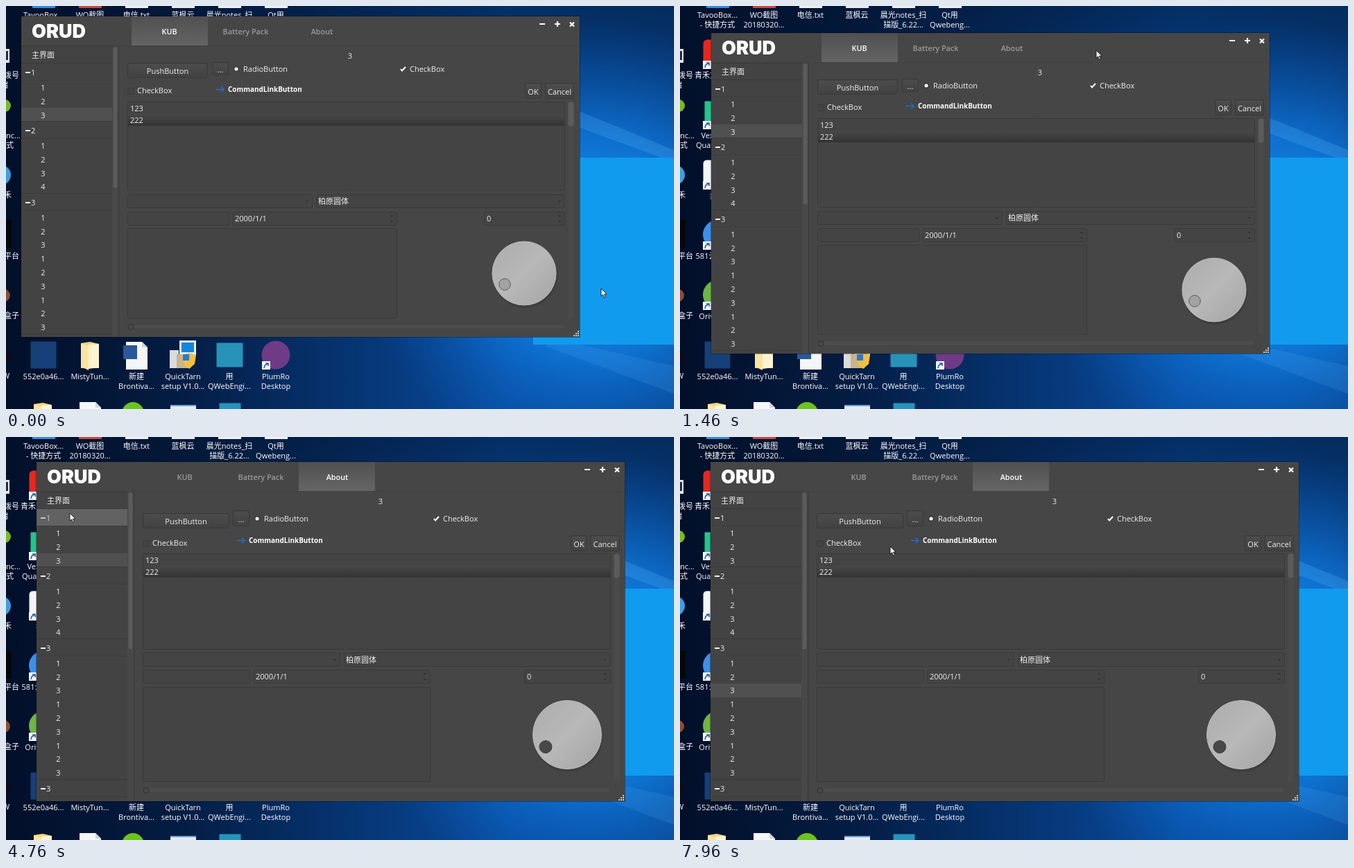
An HTML page with a canvas for the animation above (8000 ms loop, 963 by 582 pixels).

```html
<!DOCTYPE html>
<html lang="zh">
<head>
<meta charset="utf-8">
<title>Desktop window demo</title>
<style>
html, body { margin: 0; width: 100%; height: 100%; overflow: hidden; background: #041a3d; }
canvas { display: block; }
</style>
</head>
<body>
<canvas id="stage" width="963" height="582"></canvas>
<script>
const W = 963, H = 582, LOOP = 8000;
const FACE = '"Open Sans", "Noto Sans CJK SC", "Noto Sans CJK", sans-serif';
const screen2d = document.getElementById('stage').getContext('2d');
let c = screen2d;

// ---------- drawing helpers ----------
function rect(x, y, w, h, fill) {
  c.fillStyle = fill;
  c.fillRect(x, y, w, h);
}
function disc(x, y, r, fill, line) {
  c.beginPath();
  c.arc(x, y, r, 0, Math.PI * 2);
  if (fill) { c.fillStyle = fill; c.fill(); }
  if (line) { c.strokeStyle = line; c.lineWidth = 1; c.stroke(); }
}
function round(x, y, w, h, r, fill, line) {
  c.beginPath();
  c.roundRect(x + .5, y + .5, w - 1, h - 1, r);
  if (fill) { c.fillStyle = fill; c.fill(); }
  if (line) { c.strokeStyle = line; c.lineWidth = 1; c.stroke(); }
}
function poly(points, fill) {
  c.beginPath();
  points.forEach(([x, y]) => c.lineTo(x, y));
  c.closePath();
  c.fillStyle = fill;
  c.fill();
}
function strokes(lines, color, width) {
  c.strokeStyle = color;
  c.lineWidth = width;
  c.beginPath();
  for (const [first, ...rest] of lines) {
    c.moveTo(...first);
    rest.forEach(p => c.lineTo(...p));
  }
  c.stroke();
}
// y is the middle of the capitals
function text(s, x, y, { color = '#f0f0f0', align = 'left', font = '11px ' + FACE, drop = 4 } = {}) {
  c.font = font;
  c.textAlign = align;
  c.fillStyle = color;
  c.fillText(s, x, y + drop);
}
function ramp(x0, y0, x1, y1, ...stops) {
  const g = c.createLinearGradient(x0, y0, x1, y1);
  stops.forEach((s, i) => g.addColorStop(i / (stops.length - 1), s));
  return g;
}

// ---------- desktop ----------
function wallpaper() {
  rect(0, 0, W, H, ramp(0, 0, W, 0, '#020f29', '#041c42', '#06336f', '#084b9e', '#08468f'));
  rect(0, 0, W, 220, ramp(0, 0, 0, 220, 'rgba(2,18,44,.5)', 'rgba(2,18,44,0)'));
  const glow = c.createRadialGradient(850, 350, 20, 850, 350, 330);
  glow.addColorStop(0, 'rgba(22,160,255,.9)');
  glow.addColorStop(.45, 'rgba(16,130,232,.7)');
  glow.addColorStop(1, 'rgba(10,90,190,0)');
  c.fillStyle = glow;
  c.fillRect(0, 0, W, H);
  poly([[780, 133], [W, 208], [W, 226], [780, 158]], 'rgba(90,185,255,.22)');
  poly([[780, 478], [W, 520], [W, 560], [780, 492]], 'rgba(90,185,255,.14)');
  rect(760, 219, 272, 270, '#119bee');
}
function shortcut(x, y) {
  rect(x, y, 12, 12, '#f4f6f8');
  strokes([[[x + 3, y + 10], [x + 4, y + 6], [x + 9, y + 3]], [[x + 5, y + 3], [x + 9, y + 3], [x + 9, y + 7]]], '#2760ad', 1.6);
}
function folder(x, y) {
  poly([[x + 7, y + 4], [x + 20, y + 2], [x + 33, y + 5], [x + 33, y + 40], [x + 7, y + 40]], '#f3d684');
  poly([[x + 18, y + 6], [x + 33, y + 5], [x + 33, y + 39], [x + 18, y + 41]], '#fff4d2');
  poly([[x + 7, y + 4], [x + 18, y + 8], [x + 18, y + 43], [x + 7, y + 38]], '#fbe4a0');
}
function page(x, y) {
  poly([[x + 6, y], [x + 29, y], [x + 37, y + 8], [x + 37, y + 40], [x + 6, y + 40]], '#f4f6f9');
  poly([[x + 29, y], [x + 37, y + 8], [x + 29, y + 8]], '#cdd6e0');
}
function installer(x, y) {
  rect(x + 16, y, 24, 21, '#e9edf0');
  rect(x + 19, y + 3, 18, 14, '#1686d8');
  rect(x + 2, y + 14, 13, 26, '#d9dcde');
  rect(x + 12, y + 20, 20, 20, '#c9b48c');
  poly([[x + 20, y + 21], [x + 30, y + 18], [x + 40, y + 21], [x + 38, y + 34], [x + 30, y + 41], [x + 22, y + 34]], '#f0c040');
  rect(x + 21, y + 20, 9, 9, '#2f78c8');
}
function icons() {
  const left = col => 33 + col * 67;
  const caption = (col, row, ...lines) =>
    lines.forEach((s, i) => text(s, 54 + col * 67, 13 + row * 87 + i * 14, { align: 'center', color: '#fff' }));

  // bottoms of the row cut by the upper edge
  ['#2d8ce6', '#c8493c', '#eef1f4', '#e8ebef', '#eef1f4', '#eef1f4'].forEach((f, i) => rect(left(i) + 5, 0, 33, 3, f));
  caption(0, 0, 'TavooBox...', '- 快捷方式');
  caption(1, 0, 'WO截图', '20180320...');
  caption(2, 0, '电信.txt');
  caption(3, 0, '蓝枫云');
  caption(4, 0, '晨光notes_扫', '描版_6.22...');
  caption(5, 0, 'Qt用', 'Qwebeng...');

  round(33, 48, 43, 43, 6, '#e5281f');
  round(35, 137, 40, 40, 1, '#25c58a');
  round(33, 222, 43, 43, 5, '#f2f6fb');
  disc(54, 330, 21, '#3f8fe8');
  disc(54, 417, 21, '#6fb544');
  for (let row = 1; row < 6; row++) shortcut(33, 79 + (row - 1) * 87);
  caption(0, 1, '青禾文达词典');
  caption(0, 2, 'VexForge', 'QuaLume ...');
  caption(0, 3, '疾羽');
  caption(0, 4, '581云帆浏览', '器');
  caption(0, 5, 'Orivund....');

  round(35, 484, 38, 40, 1, '#173f78');
  folder(left(1) + 1, 483);
  page(left(2), 485);
  rect(left(2) + 2, 490, 20, 20, '#2b579a');
  installer(left(3), 483);
  round(left(4) + 2, 486, 39, 36, 1, '#2793b8');
  disc(389, 504, 20.5, '#6f3a86');
  shortcut(369, 513);
  caption(0, 6, '552e0a46...');
  caption(1, 6, 'MistyTun...');
  caption(2, 6, '新建', 'Brontiva...');
  caption(3, 6, 'QuickTarn', 'setup V1.0...');
  caption(4, 6, '用', 'QWebEngi...');
  caption(5, 6, 'PlumRo', 'Desktop');

  folder(left(0), 571);
  page(left(1), 572);
  disc(183, 588, 16, '#6cc31d');
  rect(237, 576, 37, 6, '#e6ebf0');
  rect(237, 576, 37, 2, '#6b9fd4');
  round(left(4) + 6, 573, 32, 30, 1, '#2793b8');

  // slivers of the neighbouring columns
  rect(0, 62, 5, 20, '#e4e8ec');
  rect(0, 65, 3, 13, '#1b3350');
  disc(-2, 144, 9, '#79b928');
  disc(-7, 244, 14, '#3c9fe2');
  rect(0, 309, 8, 40, '#05070b');
  disc(-3, 418, 9, '#8a4d32');
  disc(-6, 507, 10, '#15090c');
  [['号', 8, 100], ['拨', -3, 100], ['端', -8, 114], ['nc...', 0, 187], ['式', 0, 201], ['禾', -3, 273],
   ['平台', -3, 361], ['盒子', -3, 447], ['W', -5, 534], ['小', 95, 100], ['Ex', 90, 288], ['开', 90, 447]]
    .forEach(([s, x, y]) => text(s, x, y, { color: '#fff' }));
  rect(100, 55, 4, 30, '#e0762c');
  rect(100, 253, 4, 12, '#f4f6f8');
  rect(100, 340, 4, 12, '#f4f6f8');
  rect(100, 427, 4, 12, '#f4f6f8');
}
const desktop = document.createElement('canvas');
desktop.width = W;
desktop.height = H;

// ---------- time line ----------
// start, end and number of picture changes
const SPANS = [[100, 580, 6], [820, 1560, 8], [1790, 2450, 7], [2670, 3430, 8], [3550, 4320, 8],
               [4420, 5190, 8], [5320, 5640, 4], [5850, 6510, 7], [6720, 7490, 8], [7610, 7960, 4]];
const PLACE = [[0, 22, 15], [715, 22, 15], [925, 68, 28], [1031, 102, 39], [1243, 72, 67], [1349, 55, 55], [1454, 45, 39], [1560, 44, 36]];
const GROW = [[2560, 0], [2990, 1]];
const POINTER = [[0, 858, 408], [4, 858, 408], [580, 577, 40], [1680, 599, 61], [2450, 843, 495], [2560, 843, 495],
  [2990, 885, 523], [3000, 885, 523], [3430, 515, 300], [3440, 515, 300], [3950, 380, 60], [4320, 485, 68],
  [4750, 92, 110], [5080, 80, 92], [5210, 82, 93], [5530, 75, 176], [5740, 75, 178], [5960, 108, 211],
  [6300, 100, 300], [6510, 126, 362], [6610, 126, 362], [6940, 250, 230], [7160, 433, 118], [7490, 290, 120],
  [7493, 290, 120], [7960, 303, 158]];

function heldTime(t) {
  let held = 0;
  for (const [from, to, n] of SPANS) {
    if (t < from) break;
    const step = (to - from) / (n - 1);
    held = from + step * Math.min(n - 1, Math.floor((t - from + 12) / step));
  }
  return held;
}
function along(keys, t) {
  if (t <= keys[0][0]) return keys[0].slice(1);
  const i = keys.findIndex(key => key[0] > t);
  if (i < 0) return keys[keys.length - 1].slice(1);
  const a = keys[i - 1], b = keys[i], f = (t - a[0]) / (b[0] - a[0]);
  return a.slice(1).map((v, j) => v + (b[j + 1] - v) * f);
}

// ---------- application window ----------
const GROUPS = [['1', '1 2 3'], ['2', '1 2 3 4'], ['3', '1 2 3 1 2 3 1 2 3'], ['3', '']];

function sidebar(h, thumbEnd, selected, hover) {
  rect(0, 43, 131, h - 43, '#434343');
  const over = (y, tall) => hover && hover[0] < 131 && hover[0] >= 0 && hover[1] >= y && hover[1] < y + tall;
  const row = (y, tall, mark) => {
    if (over(y, tall)) rect(0, Math.round(y), 131, Math.round(tall), '#626262');
    else if (mark) rect(0, Math.round(y), 131, Math.round(tall), '#505050');
    return over(y, tall) ? '#c4c4c4' : '#f0f0f0';
  };
  text('主界面', 15, 56, { color: row(43, 25) });
  rect(0, 43, 131, 1, '#3a3a3a');
  let y = 68, n = 0;
  for (const [name, items] of GROUPS) {
    const color = row(y, 24.6);
    rect(0, Math.round(y) - 1, 131, 1, '#3a3a3a');
    rect(0, Math.round(y + 24), 131, 1, '#3d3d3d');
    rect(6, Math.round(y + 12), 7, 2, color);
    text(name, 14, y + 13, { color });
    y += 24.6;
    for (const item of items.split(' ').filter(Boolean)) {
      text(item, 31.5, y + 10.3, { align: 'center', color: row(y, 19.8, n++ === selected) });
      y += 19.8;
    }
  }
  rect(131, 43, 9, h - 43, '#484848');
  round(132, 44, 7, thumbEnd - 44, 2, '#5b5b5b');
  rect(140, 43, 1, h - 43, '#383838');
}

function panel(k, s) {
  const m = (a, b) => Math.round(a + (b - a) * k);
  const frame = (a, b, fill = '#444', line = '#393939') => {
    const [x, y, x2, y2] = a.map((v, i) => m(v, b[i]));
    round(x, y, x2 - x, y2 - y, 2, fill, line);
    return [x, y, x2, y2];
  };
  const button = (a, b, label, hot) => {
    const [x, y, x2, y2] = frame(a, b);
    round(x + 1, y + 1, x2 - x - 2, y2 - y - 2, 2, ramp(0, y, 0, y2, hot ? '#626262' : '#4d4d4d', hot ? '#555' : '#414141'));
    text(label, (x + x2) / 2, (y + y2) / 2 + 1, { align: 'center' });
  };
  const arrow = (x, y, dir) => poly([[x - 2.5, y - dir], [x + 2.5, y - dir], [x, y + 1.5 * dir]], '#303030');

  text(s.label, m(474, 496), m(57, 57.4), { align: 'center' });
  button([153, 67, 269, 89], [153, 74, 278, 96], 'PushButton', s.hot);
  button([275, 66, 299, 85], [283, 70, 307, 93], '...');

  let y = m(76, 82);
  disc(m(310, 318), y, 4.5, '#404040');
  disc(m(310, 318), y, 2.5, '#fff');
  text('RadioButton', m(320, 328), y);
  const tick = m(550, 576);
  strokes([[[tick - 3, y], [tick - 1, y + 2.5], [tick + 4, y - 3]]], '#fff', 2);
  text('CheckBox', m(560, 586), y);

  y = m(107, 117);
  round(153, y - 4, 10, 10, 1, '#434343', '#3a3a3a');
  text('CheckBox', 167, y);
  const link = m(281, 289), ly = m(105, 113) + .5;
  strokes([[[link, ly], [link + 11, ly]], [[link + 7, ly - 4], [link + 11, ly], [link + 7, ly + 4]]], '#1c70d4', 1.3);
  text('CommandLinkButton', link + 17, ly - .5, { font: 'bold 9.95px ' + FACE, color: '#fff' });
  button([726, 96, 750, 119], [770, 106, 794, 129], 'OK');
  button([755, 96, 797, 119], [798, 106, 841, 129], 'Cancel');

  const [lx, top, lx2] = frame([153, 123, 784, 252], [153, 132, 828, 271]);
  rect(lx + 1, top + 18, lx2 - lx - 2, 17, ramp(0, top + 18, 0, top + 35, '#484848', '#333'));
  text('123', 157, top + 10);
  text('222', 157, top + 27);

  const bar = m(788, 832), barTop = m(123, 132);
  round(bar, barTop, 9, m(435, 462) - barTop, 3, '#4a4a4a');
  round(bar, barTop, 9, 36, 3, '#5b5b5b');

  let b = frame([153, 257, 420, 277], [153, 275, 438, 296]);
  arrow(b[2] - 8, (b[1] + b[3]) / 2, 1);
  b = frame([425, 257, 784, 277], [443, 275, 828, 296]);
  arrow(b[2] - 8, (b[1] + b[3]) / 2, 1);
  text('柏原圆体', b[0] + 3, (b[1] + b[3]) / 2);
  frame([153, 282, 300, 302], [153, 300, 308, 320]);
  for (const [small, large, value] of [[[304, 282, 542, 302], [312, 300, 568, 320], '2000/1/1'],
                                       [[667, 282, 784, 302], [703, 300, 828, 320], '0']]) {
    b = frame(small, large);
    arrow(b[2] - 8, b[1] + 6, -1);
    arrow(b[2] - 8, b[1] + 14, 1);
    text(value, b[0] + 4, b[1] + 10);
  }
  b = frame([153, 306, 542, 436], [153, 325, 568, 462]);
  if (s.caret) rect(b[0] + 5, b[1] + 5, 1, 14, '#e8e8e8');

  const dx = m(725, 765), dy = m(371, 393.5), r = 46 + 3.5 * k;
  disc(dx + 1, dy + 3, r + 1, 'rgba(0,0,0,.12)');
  disc(dx, dy, r, ramp(dx - r, dy - r, dx + r, dy + r, '#acacac', '#b8b8b8', '#a4a4a4'), '#bcbcbc');
  disc(dx - 28 - 3 * k, dy + 16 + 1.5 * k, 8.3 + .7 * k, k > 0 ? '#484848' : '#a2a2a2', k > 0 ? '#3c3c3c' : '#5c5c5c');

  const sy = m(448, 474);
  round(153, sy - 3, m(630, 674), 6, 3, '#4d4d4d');
  disc(158, sy + .5, 4, '#484848', '#2f2f2f');
}

function appWindow(x, y, k, s) {
  const w = Math.round(805 + 43 * k), h = Math.round(463 + 27 * k);
  c.save();
  c.translate(x, y);
  rect(-1, -1, w + 2, h + 2, 'rgba(0,0,0,.3)');
  c.beginPath();
  c.rect(0, 0, w, h);
  c.clip();
  rect(0, 0, w, h, '#464646');
  sidebar(h, 248 + 23 * k, s.selected, s.hover);
  rect(0, 42, w, 1, '#414141');

  text('ORUD', 15, 21, { font: '900 27px Inter, sans-serif', color: '#fff', drop: 10 });
  rect(159 + s.tab * 109.5, 0, 110, 42, ramp(0, 0, 0, 42, '#505050', '#656565'));
  ['KUB', 'Battery Pack', 'About'].forEach((name, i) => text(name, 213.5 + i * 110, 22, {
    align: 'center', font: '600 10.8px ' + FACE, color: i === s.tab ? '#fff' : '#9b9b9b'
  }));
  rect(w - 58, 10, 8, 2, '#fff');
  strokes([[[w - 36, 11], [w - 28, 11]], [[w - 32, 7], [w - 32, 15]]], '#fff', 2.2);
  strokes([[[w - 14, 8.5], [w - 8, 14.5]], [[w - 8, 8.5], [w - 14, 14.5]]], '#fff', 2.2);

  panel(k, s);
  for (let i = 0; i < 3; i++)
    for (let j = 0; j <= i; j++) rect(w - 3 - j * 3, h - 9 + i * 3, 2, 2, '#c8c8c8');
  c.restore();
}

// ---------- pointer ----------
function pointer(x, y, sizing) {
  c.save();
  c.translate(x, y);
  c.lineJoin = 'round';
  if (sizing) {
    for (const [color, width] of [['#fff', 3.4], ['#111', 1.3]])
      strokes([[[-4, -4], [4, 4]], [[-4, 0], [-4, -4], [0, -4]], [[4, 0], [4, 4], [0, 4]]], color, width);
  } else {
    poly([[0, 0], [0, 11.2], [2.6, 8.8], [4.6, 13.4], [6.4, 12.6], [4.5, 8.2], [8, 8]], '#fff');
    c.strokeStyle = '#111';
    c.lineWidth = .9;
    c.stroke();
  }
  c.restore();
}

function draw(t) {
  const q = heldTime(t);
  const [wx, wy] = along(PLACE, q).map(Math.round);
  const [k] = along(GROW, q);
  const dragging = q >= 580 && q < 1700;
  const [px, py] = dragging ? [wx + 555, wy + 25] : along(POINTER, q).map(Math.round);
  const onHeader = q >= 5000 && q < 5500;
  const state = {
    tab: q < 3900 ? 0 : q < 4200 ? 1 : 2,
    selected: onHeader ? -1 : q < 6450 ? 2 : 9,
    label: onHeader ? '主界面' : q >= 6060 && q < 6450 ? '2' : '3',
    caret: t >= 930 && t < 4430 && Math.floor((t - 930) / 500) % 2 === 0,
    hot: q >= 7400 && q < 7800,
    hover: [px - wx, py - wy]
  };
  c = screen2d;
  c.drawImage(desktop, 0, 0);
  appWindow(wx, wy, k, state);
  pointer(px, py, q >= 2440 && q < 3100);
}

c = desktop.getContext('2d');
wallpaper();
icons();

const began = performance.now();
function tick() {
  draw((performance.now() - began) % LOOP);
  requestAnimationFrame(tick);
}
tick();
</script>
</body>
</html>
```
